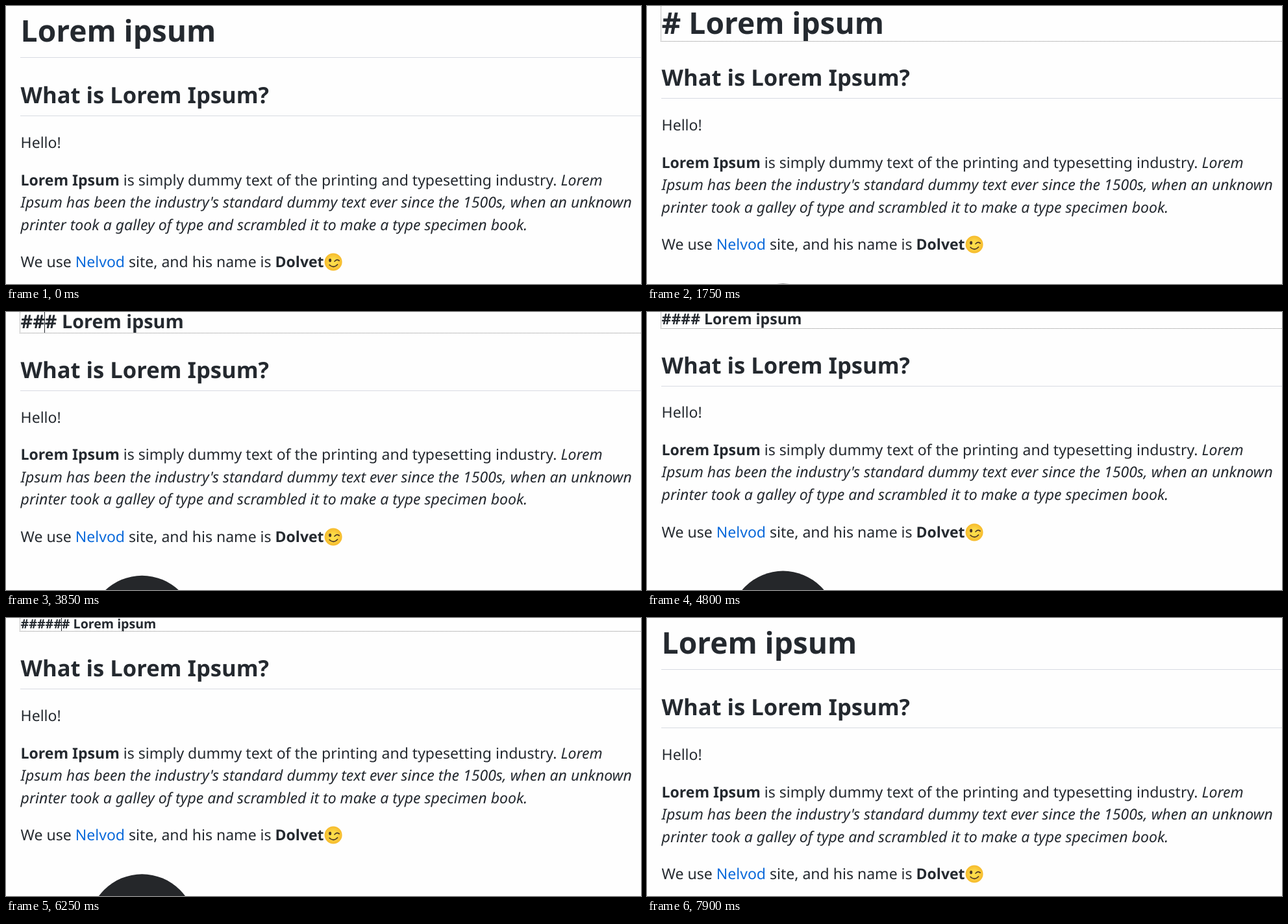
An HTML page with a canvas for the animation above (8 s loop, 978 by 429 pixels).

```html
<!DOCTYPE html>
<html lang="en">
<head>
<meta charset="utf-8">
<title>Heading levels</title>
<style>
  html, body { margin: 0; width: 100%; height: 100%; overflow: hidden; background: #fefefe; }
  canvas { display: block; }
</style>
</head>
<body>
<canvas id="stage" width="978" height="429"></canvas>
<script>
const W = 978, H = 429, LOOP = 8000;
const EM = 23.04, LINE = 1.5 * EM, LEFT = 22.6, EDGE = 22;
const PAPER = '#fefefe', INK = '#24292f', LINK = '#0969da', RULE = '#d8dbe2', DOT = '#858585';
const BODY = '"Noto Sans", sans-serif';

// Heading sizes in em; index 0 is the rendered view, the others are h1 to h6.
const SCALE = [2, 2, 1.5, 1.25, 1, 0.875, 0.85];

// Each time types one more #; then they are erased at an even pace.
const TYPED = [900, 1950, 2500, 3950, 4950, 5900];
const ERASE = 6400, ERASE_STEP = 75, DONE = 7150;

const ctx = document.getElementById('stage').getContext('2d');
ctx.textRendering = 'geometricPrecision';

function stateAt(t) {
  if (t < TYPED[0] || t >= DONE) return { level: 0, age: 0 };
  if (t < ERASE) {
    const level = TYPED.filter(time => time <= t).length;
    return { level, age: t - TYPED[level - 1] };
  }
  const erased = Math.min(Math.floor((t - ERASE) / ERASE_STEP), TYPED.length - 2);
  return { level: TYPED.length - 1 - erased, age: t - ERASE - erased * ERASE_STEP };
}

// Draws a run of text and returns the x where it ends.
function text(str, x, y, style = '', size = EM, color = INK) {
  ctx.font = `${style} ${size}px ${BODY}`;
  ctx.fillStyle = color;
  ctx.fillText(str, x, Math.round(y));
  return x + ctx.measureText(str).width;
}

function box(x, y, w, h, color) {
  ctx.fillStyle = color;
  ctx.fillRect(x, y, w, h);
}

function rule(y) {
  box(EDGE, Math.round(y), W - EDGE, 1, RULE);
}

function oval(x, y, rx, ry, color) {
  ctx.fillStyle = color;
  ctx.beginPath();
  ctx.ellipse(x, y, rx, ry, 0, 0, 2 * Math.PI);
  ctx.fill();
}

function curve(x1, y1, cx, cy, x2, y2) {
  ctx.beginPath();
  ctx.moveTo(x1, y1);
  ctx.quadraticCurveTo(cx, cy, x2, y2);
  ctx.stroke();
}

function wink(x, y) {
  ctx.save();
  ctx.translate(x, y);
  const face = ctx.createRadialGradient(0, 0, 4, 0, 0, 13.5);
  face.addColorStop(0, '#fddd4a');
  face.addColorStop(1, '#f6ba2c');
  oval(0, 0, 13.5, 13.5, face);
  oval(-5, -2.5, 2, 2.8, '#4a3426');
  ctx.strokeStyle = '#4a3426';
  ctx.lineWidth = 1.7;
  ctx.lineCap = 'round';
  curve(2, -1, 5.5, -5, 9, -2);
  curve(-6, 4.5, 0.5, 10.5, 6.5, 4);
  ctx.restore();
}

function heading(level, age) {
  const size = SCALE[level] * EM;
  const top = level ? -4 : 8.3;
  const hashes = '#'.repeat(level);
  text(level ? hashes + ' Lorem ipsum' : 'Lorem ipsum', LEFT, top + 1.013 * size, 'bold', size);
  if (!level) return rule(79);

  const bottom = Math.round(top + 1.25 * size);
  for (let x = EDGE - 1; x < W; x += 2) box(x, bottom, 1, 1, DOT);
  for (let y = bottom; y >= 0; y -= 2) box(EDGE - 1, y, 1, 1, DOT);
  if (age % 1000 < 500) {
    const caret = LEFT + ctx.measureText(hashes.slice(1)).width;
    box(Math.floor(caret), 0, 1, bottom, INK);
  }
}

function article(shift) {
  text('What is Lorem Ipsum?', LEFT, 150.2 + shift, 'bold', 1.5 * EM);
  rule(169.2 + shift);

  let y = 218.9 + shift;
  text('Hello!', LEFT, y);

  y += LINE + EM;
  let x = text('Lorem Ipsum', LEFT, y, 'bold');
  x = text(' is simply dummy text of the printing and typesetting industry. ', x, y);
  text('Lorem', x, y, 'italic');
  y += LINE;
  text("Ipsum has been the industry's standard dummy text ever since the 1500s, when an unknown",
    LEFT, y, 'italic');
  y += LINE;
  text('printer took a galley of type and scrambled it to make a type specimen book.',
    LEFT, y, 'italic');

  y += LINE + EM;
  x = text('We use ', LEFT, y);
  x = text('Nelvod', x, y, '', EM, LINK);
  x = text(' site, and his name is ', x, y);
  x = text('Dolvet', x, y, 'bold');
  wink(x + 14.5, Math.round(y) - 8);
  oval(209.5, y + 134.5, 82.5, 82.5, '#25272a');
}

function draw(t) {
  const { level, age } = stateAt(t);
  box(0, 0, W, H, PAPER);
  heading(level, age);
  article(level ? 1.25 * EM * (SCALE[level] - 2) - 26.8 : 0);
}

function tick() {
  draw(performance.now() % LOOP);
  requestAnimationFrame(tick);
}
tick();
</script>
</body>
</html>
```
